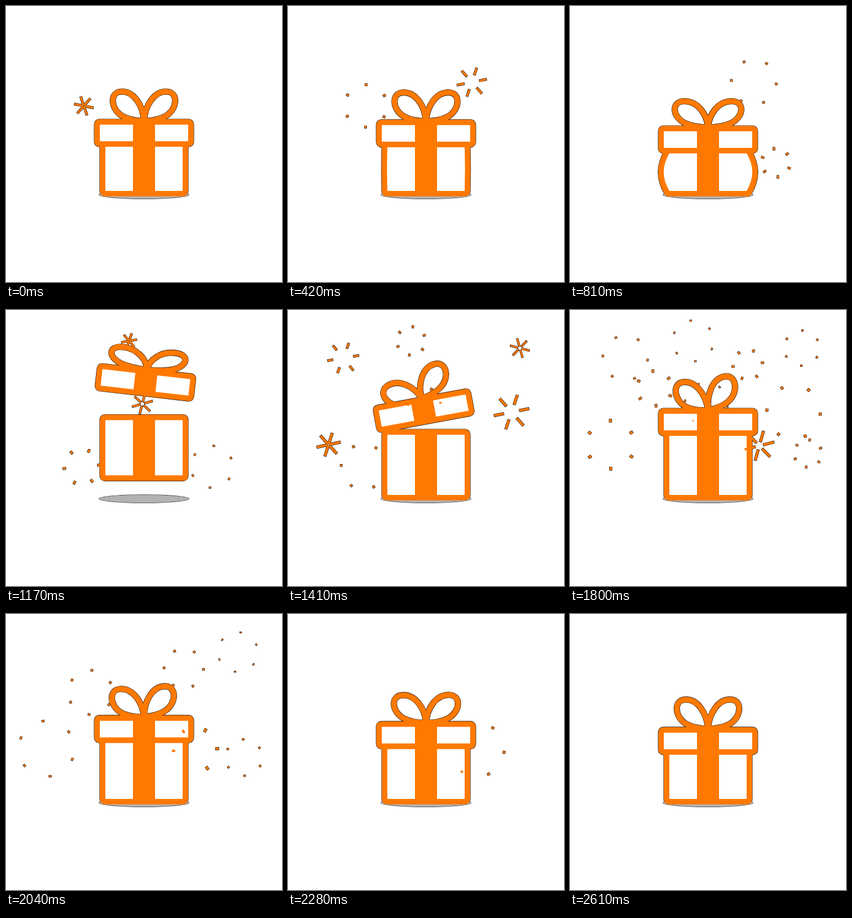
These frames come from a looping animation (500 px wide and 500 px high, 2.64 s). An HTML page with a canvas:

```html
<!DOCTYPE html>
<html lang="en">
<head>
<meta charset="utf-8">
<title>Gift box</title>
<style>
  html, body { margin: 0; height: 100%; overflow: hidden; background: #fff; }
  canvas { display: block; width: 100vmin; height: 100vmin; }
</style>
</head>
<body>
<canvas width="500" height="500"></canvas>
<script>
const ctx = document.querySelector('canvas').getContext('2d');
const LOOP = 2640, ORANGE = '#ff7900', EDGE = '#000', GREY = '#b2b2b2';
const RAD = Math.PI / 180;

const span = (t, from, to) => Math.min(1, Math.max(0, (t - from) / (to - from)));
const easeOut = (p, power) => 1 - (1 - p) ** power;

// Eases from one [time, value] key to the next
function track(...keys) {
  return t => keys.reduce((value, [time, next], i) => {
    if (i === 0) return next;
    const u = span(t, keys[i - 1][0], time);
    return value + (next - keys[i - 1][1]) * u * u * (3 - 2 * u);
  }, 0);
}

const bodyHeight = track([330, 100], [960, 86], [1170, 120], [1400, 129], [1800, 127], [LOOP, 100]);
const lidAngle = track([1000, 0], [1170, 6.5], [1410, -10.5], [1560, 0]);
const bowHeight = track([300, 1], [810, .89], [1170, .68], [1500, 1.03], [1800, 1.03], [2280, .95], [LOOP, 1]);
const loopTilt = track([1170, 0], [1430, -20], [1840, -5], [2250, 0]);
const bodyHop = t => 37 * Math.sin(Math.PI * span(t, 1020, 1390));
const lidHop = t => 43.5 * Math.sin(Math.PI * span(t, 1000, 1520) ** .65);

// x, y, radius, start time
const bursts = [
  [141, 181, 47, -177], [333, 138, 46, 101], [223, 56, 40, 1004], [137, 284, 47, 736],
  [373, 284, 42, 425], [247, 170, 41, 938], [73.5, 244, 54, 1215], [405, 185, 55, 1095],
  [420, 69, 38, 1175], [100, 87, 45, 1055], [431, 260, 39, 1400], [322, 99, 42, 1397],
  [153, 142, 46, 1354], [343, 246, 54, 1540]
];

// Six rays fly outward, turning, while their tails catch up
function burst(t, grow, [x, y, radius, start], index) {
  const p = (t - start) / 1240;
  if (p < .125 || p > .71) return;
  const shortAt = radius * .0075;
  const length = .37 - .26 * span(p, .22, shortAt) - .06 * span(p, shortAt, .71);
  const outer = easeOut(p, 3), inner = Math.max(.02, outer - length);
  const spin = index % 4 === 2 ? -42 : 42;
  const turn = (index % 2 ? -30 : 0) + spin * easeOut(p, 2);
  ctx.lineWidth = radius * .08 + 2 * grow;
  ctx.beginPath();
  for (let i = 0; i < 6; i++) {
    const c = Math.cos((turn + i * 60) * RAD), s = Math.sin((turn + i * 60) * RAD);
    const r0 = inner * radius - grow, r1 = outer * radius + grow;
    ctx.moveTo(x + c * r0, y + s * r0);
    ctx.lineTo(x + c * r1, y + s * r1);
  }
  ctx.stroke();
}

// Closed block whose sides can bow outward
function block(left, right, top, bottom, bendLeft, bendRight) {
  const mid = (top + bottom) / 2;
  ctx.beginPath();
  ctx.moveTo(left, bottom);
  ctx.quadraticCurveTo(left - 2 * bendLeft, mid, left, top);
  ctx.lineTo(right, top);
  ctx.quadraticCurveTo(right + 2 * bendRight, mid, right, bottom);
  ctx.closePath();
}

function crate(half, top, bottom, bend, grow) {
  block(9 - half, half - 9, top + 9, bottom - 9, bend, bend);
  ctx.lineWidth = 18 + 2 * grow;
  ctx.fill();
  ctx.stroke();
  if (grow) return;
  ctx.fillStyle = '#fff';
  block(10 - half, -20, top + 10, bottom - 10, bend, 0);
  ctx.fill();
  block(20, half - 10, top + 10, bottom - 10, 0, bend);
  ctx.fill();
  ctx.fillStyle = ORANGE;
}

function bow(t, grow) {
  const tall = bowHeight(t), wide = 1 + .6 * (1 - tall);
  ctx.lineWidth = 10 + 2 * grow;
  for (const side of [-1, 1]) {
    ctx.save();
    ctx.translate(0, -25);
    ctx.rotate(loopTilt(side > 0 ? t - 120 : t) * RAD);  // right loop lags
    ctx.scale(side * wide, tall);
    ctx.beginPath();
    ctx.moveTo(0, 3);
    ctx.bezierCurveTo(2, -25, 18, -50, 40, -50);
    ctx.bezierCurveTo(62, -50, 62, -20, 40, -6);
    ctx.bezierCurveTo(28, 1, 12, 3, 0, 3);
    ctx.restore();
    ctx.stroke();
  }
}

function scene(t, grow) {
  const ink = grow ? EDGE : ORANGE;
  ctx.strokeStyle = ink;
  ctx.fillStyle = grow ? EDGE : GREY;
  ctx.beginPath();
  ctx.ellipse(250, 342, 81.5 + grow, 7.2 + grow, 0, 0, 7);
  ctx.fill();
  ctx.fillStyle = ink;

  ctx.lineJoin = 'round';
  const height = bodyHeight(t), angle = lidAngle(t);
  const bottom = 345 - bodyHop(t), top = bottom - height;
  ctx.save();
  ctx.translate(250, 0);
  crate(80, top, bottom, Math.max(0, 100 - height) * .85, grow);
  ctx.translate(angle * .4, top - 15 - lidHop(t));
  ctx.rotate(angle * RAD);
  bow(t, grow);
  crate(90, -25, 25, 0, grow);
  ctx.restore();

  bursts.forEach((b, i) => burst(t, grow, b, i));
}

function frame() {
  const t = performance.now() % LOOP;
  ctx.clearRect(0, 0, 500, 500);
  scene(t, .6);  // dark rim
  scene(t, 0);
  requestAnimationFrame(frame);
}
frame();
</script>
</body>
</html>
```
